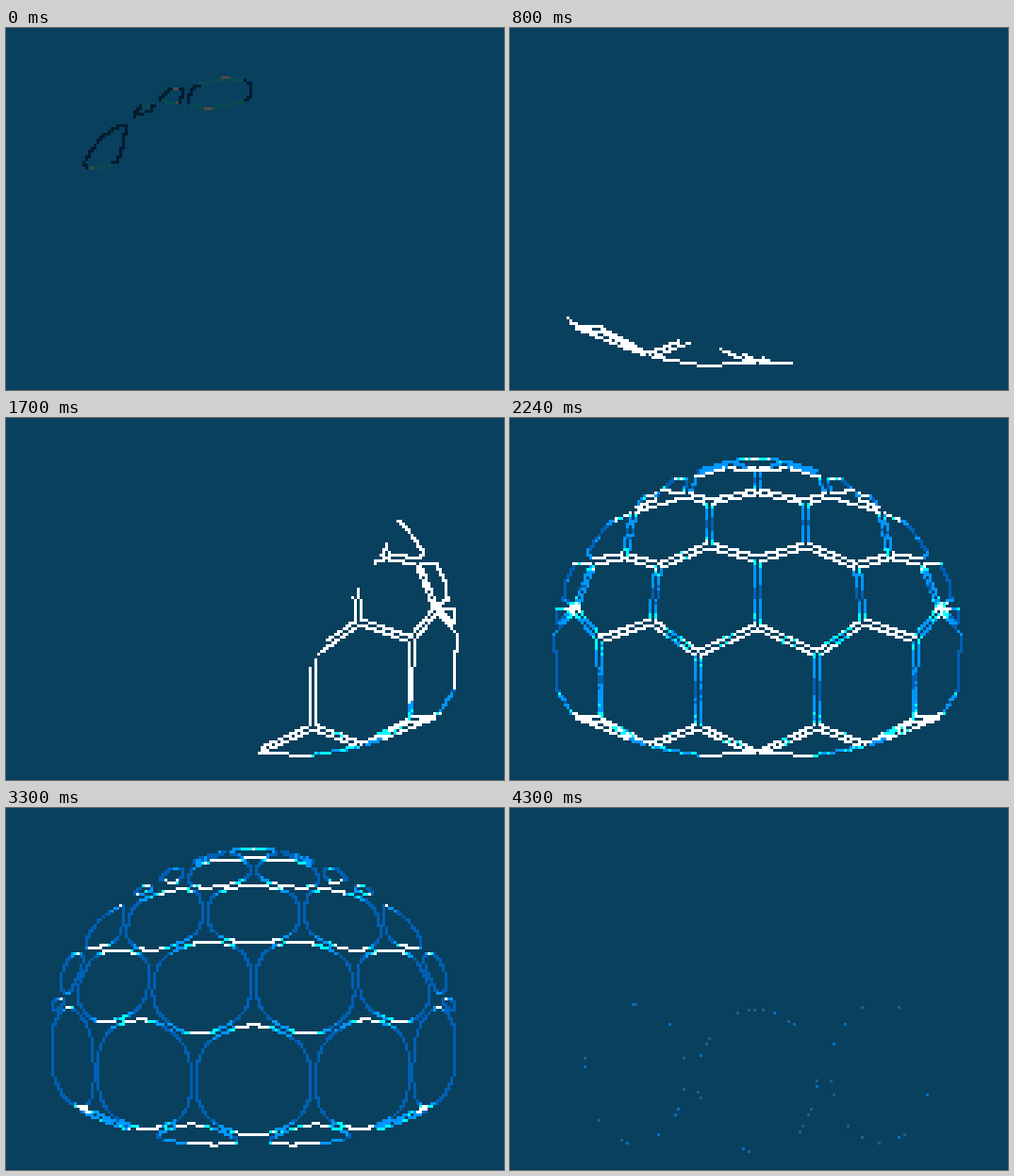
These frames come from a looping animation (528x384 px, 4.4 s). An HTML page with a canvas:

```html
<!DOCTYPE html>
<html>
<head>
<meta charset="utf-8">
<style>
  html, body { margin: 0; width: 100%; height: 100%; overflow: hidden; background: #09405e; }
  canvas { display: block; width: 100%; height: 100%; image-rendering: pixelated; }
</style>
</head>
<body>
<canvas id="stage" width="176" height="128"></canvas>
<script>
const ctx = document.getElementById('stage').getContext('2d');
const LOOP = 4400, PIXEL = 3, MIRROR = 525, MID = 262.5;
const BRIGHT = ['#ffffff', '#00ffff', '#0096ff', '#0060b4'];
const DARK = ['#4f4a48', '#0a4a50', '#00202f', '#021a30'];

// Shared corners of the left half of the dome.
const foot = [MID, 357], footL = [199, 328], dip = [147, 349], edgeLow = [95, 321];
const edgeHigh = [95, 235], waistL = [199, 250], rise = [150, 216], heart = [MID, 221];
const rimLow = [68, 203], mid = [MID, 150], left3 = [157, 157], top3 = [211, 135];
const left4 = [122, 146], rim4 = [88, 153], left6 = [131, 98], top6 = [211, 89];
const crown = [MID, 77], left9 = [187, 81], peak = [MID, 56];
const flip = ([x, y]) => [MIRROR - x, y];

// corners, ellipse [cx, cy, rx, ry, degrees], tier (0 big, 1 small, 2 dotted)
const half = [
  [[heart, flip(waistL), flip(footL), foot, footL, waistL], [MID, 289, 60, 60, 0], 0],
  [[edgeHigh, rise, waistL, footL, dip, edgeLow], [146, 282, 51, 59, 0], 0],
  [[rimLow, edgeHigh, edgeLow, [66, 318], [46, 288], [46, 225]], [67, 267, 24, 56, 0], 0],
  [[top3, mid, heart, waistL, rise, left3], [208, 189, 50, 50, 0], 0],
  [[left4, left3, rise, edgeHigh, rimLow, rim4], [115, 188, 44, 37, -35], 0],
  [[crown, flip(top6), flip(top3), mid, top3, top6], [MID, 112, 50, 33, 0], 0],
  [[left9, top6, top3, left3, left4, left6], [169, 118, 40, 30, -35], 0],
  [[left6, left4, [84, 152], [80, 144], [90, 127], [108, 108]], [106, 124, 29, 15, -50], 1],
  [[rim4, rimLow, [55, 195], [59, 170], [68, 152]], [70, 172, 26, 9, -70], 1],
  [[left9, [195, 61], [232, 50], peak, crown, top6], [222, 71, 29, 16, -25], 0],
  [[[230, 47], [245, 43], [280, 43], [295, 47], peak], [MID, 44, 18, 11, 0], 1],
  [[rimLow, [49, 219], [50, 200]], [54, 203, 11, 11, 0], 2],
  [[[132, 96], [140, 84], [158, 79], [157, 87]], [138, 87, 17, 17, 0], 2],
  [[[157, 78], [176, 62], [190, 62], [186, 81]], [170, 64, 19, 19, 0], 2],
  [[[196, 56], [238, 45], [232, 48], [196, 60]], [222, 46, 14, 6, -15], 2],
  [[[68, 318], edgeLow, dip], [100, 334, 18, 9, 35], 2],
  [[dip, footL, foot, [200, 359]], [205, 352, 39, 9, 4], 1],
];

function makeCell([corners, ellipse, tier]) {
  const mean = [0, 1].map(a => corners.reduce((sum, p) => sum + p[a], 0) / corners.length);
  const inset = corners.map(p => {
    const dx = mean[0] - p[0], dy = mean[1] - p[1], d = Math.hypot(dx, dy);
    const q = Math.min(3.5, d * 0.15) / d;
    return [p[0] + dx * q, p[1] + dy * q];
  });
  return { corners: inset, mean, ellipse, tier };
}
const mirrorCell = ([corners, [x, y, rx, ry, deg], tier]) =>
  [corners.map(flip), [MIRROR - x, y, rx, ry, -deg], tier];

const cells = half.flatMap(c => c[1][0] === MID ? [c] : [c, mirrorCell(c)]).map(makeCell);

const clamp = v => Math.max(0, Math.min(1, v));
const ramp = (t, from, to) => clamp((t - from) / (to - from));
const mix = (a, b, k) => a + (b - a) * k;
const mixPoint = (p, q, k) => [mix(p[0], q[0], k), mix(p[1], q[1], k)];
function noise(x, y, seed) {
  const v = Math.sin(x * 12.99 + y * 78.23 + seed * 3.7) * 43758.55;
  return v - Math.floor(v);
}

function dot(x, y, color) {
  ctx.fillStyle = color;
  ctx.fillRect(Math.floor(x / PIXEL), Math.floor(y / PIXEL), 1, 1);
}

function ellipsePoint([cx, cy, rx, ry, deg], ux, uy) {
  const a = deg * Math.PI / 180, c = Math.cos(a), s = Math.sin(a);
  return [cx + c * rx * ux - s * ry * uy, cy + s * rx * ux + c * ry * uy];
}

// Points of a polygon with corners cut by r (0 to 0.5); third value is closeness to an edge's middle.
function outline(corners, r) {
  const points = [], n = corners.length;
  corners.forEach((b, i) => {
    const a = corners[(i + n - 1) % n], c = corners[(i + 1) % n];
    const p = mixPoint(b, a, r), q = mixPoint(b, c, r), end = mixPoint(c, b, r);
    if (r > 0) for (let u = 0; u < 1; u += 1 / 30)
      points.push([...mixPoint(mixPoint(p, b, u), mixPoint(b, q, u), u), r]);
    for (let u = 0; u < 1; u += 1 / 50)
      points.push([...mixPoint(q, end, u), 1 - Math.abs(2 * (r + u * (1 - 2 * r)) - 1)]);
  });
  return points;
}

// Move outline points on to the cell's ellipse.
function swell(points, { mean, ellipse }, k) {
  const [, , rx, ry, deg] = ellipse, a = deg * Math.PI / 180, c = Math.cos(a), s = Math.sin(a);
  return points.map(([x, y, e]) => {
    const dx = x - mean[0], dy = y - mean[1];
    const ux = (c * dx + s * dy) / rx, uy = (c * dy - s * dx) / ry, d = Math.hypot(ux, uy) || 1;
    return [...mixPoint([x, y], ellipsePoint(ellipse, ux / d, uy / d), k), e];
  });
}

function onRim(x, y) {
  const dx = x - MID;
  if (y < 235) return (dx / 217) ** 2 + ((y - 235) / 193) ** 2 > 0.91;
  return Math.abs(dx) > 211 || y > 319 + 42 * (1 - (dx / 195) ** 2);
}

const level = score => score < 0.42 ? 0 : score < 0.55 ? 1 : score < 0.88 ? 2 : 3;

// Calls plot(x, y, steepness 0..1, edge closeness) along a path.
function trace(points, plot) {
  points.forEach(([x, y, e], i) => {
    const next = points[(i + 1) % points.length];
    const dx = next[0] - x, dy = next[1] - y;
    plot(x, y, Math.abs(dy) / (Math.hypot(dx, dy) || 1), e);
  });
}

function darkSweep(t) {
  const head = 175 + t * 0.75;
  for (const cell of cells) {
    const [cx, cy] = cell.ellipse, d = cx * 0.5 + cy * 0.866;
    if (cy < 50 || d > head || d < head - 110) continue;
    trace(outline(cell.corners, 0.3), (x, y, steep) =>
      dot(x, y, DARK[steep < 0.1 ? 0 : steep < 0.3 ? 1 : steep < 0.7 ? 2 : 3]));
  }
}

function whiteSweep(t) {
  const head = 311 - (t - 769) * 0.68, tail = head + 170;
  for (const cell of cells) trace(outline(cell.corners, 0), (x, y) => {
    const d = y * 0.98 - x * 0.2;
    if (d > head && d < tail) dot(x, y, BRIGHT[0]);
  });
}

function dome(t) {
  const round = ramp(t, 2720, 3300), circle = ramp(t, 3300, 3700);
  const front = 414 - (t - 1700) * 0.75, tint = 424 - (t - 1700) * 0.7;
  for (const cell of cells) {
    let points = outline(cell.corners, 0.45 * round);
    if (circle) points = swell(points, cell, circle);
    trace(points, (x, y, steep, e) => {
      if (x * 0.856 + y * 0.519 < front) return;
      let shade = 0;
      if (x * 0.32 + y * 0.95 > tint) {
        const grain = noise(Math.floor(x / PIXEL), Math.floor(y / PIXEL), t / 100);
        const score = steep * mix(0.45 + 0.55 * e, 1.6, round)
          + (onRim(x, y) ? 0.45 : 0) + (grain - 0.5) * 0.2;
        shade = level(score * (1 - circle));
      }
      if (circle > 0.6) shade = Math.max(shade, cell.tier);
      dot(x, y, BRIGHT[shade]);
    });
  }
}

// Circles thin out to dots, the small ones first.
function dissolve(t) {
  const k = ramp(t, 3700, 4300);
  cells.forEach(({ ellipse: [cx, cy, rx, ry, deg], tier }, index) => {
    const end = tier ? [0, 4100, 4000][tier] : rx > 50 ? 4400 : 4300;
    const left = end - t;
    if (left <= 0) return;
    const grown = [
      MID + (cx - MID) * (1 + 0.12 * k), 286 + (cy - 286) * (1 + 0.05 * k),
      rx * (1 + 0.04 * k), ry * (1 + 0.26 * k), deg];
    const dotted = left < 400;
    const count = dotted ? Math.round(Math.PI * (rx + ry) / (2 * PIXEL)) : 400;
    const keep = left < 200 ? 0.27 : left < 300 ? 0.65 : 1;
    for (let i = 0; i < count; i++) {
      const chance = noise(i, index, 1), a = i / count * 2 * Math.PI;
      if (chance > keep) continue;
      const [x, y] = ellipsePoint(grown, Math.cos(a), Math.sin(a));
      const color = left >= 500 ? BRIGHT[0] : left >= 400 ? BRIGHT[1]
        : left >= 200 ? BRIGHT[2] : chance < 0.09 ? '#0070c8' : '#20608a';
      dot(x, y, color);
    }
  });
}

// The picture holds for 100 ms, or 120 ms in the slow middle part.
function held(t) {
  const snap = (from, step) => from + Math.floor((t - from) / step) * step;
  return t < 2000 ? snap(0, 100) : t < 3200 ? snap(2000, 120) : snap(3200, 100);
}

let shown = -1;
function frame() {
  const t = held(performance.now() % LOOP);
  if (t !== shown) {
    shown = t;
    ctx.fillStyle = '#09405e';
    ctx.fillRect(0, 0, 176, 128);
    if (t < 700) darkSweep(t);
    else if (t < 1500) whiteSweep(t);
    else if (t < 3700) dome(t);
    else dissolve(t);
  }
  requestAnimationFrame(frame);
}
frame();
</script>
</body>
</html>
```
